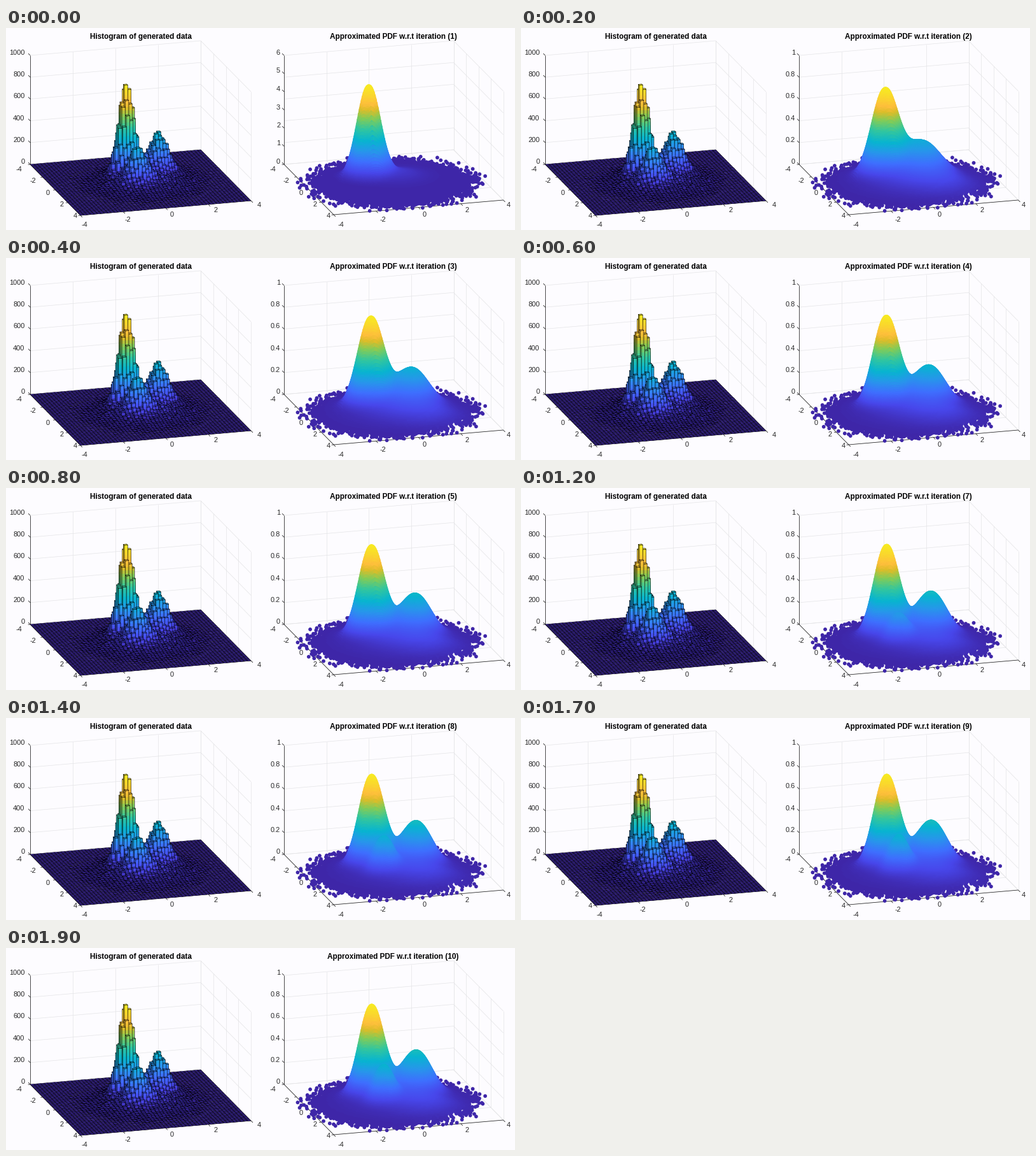
A matplotlib script for the animation above (2000 ms loop, 800 by 317 pixels).

```python
import numpy as np
import matplotlib.pyplot as plt
from matplotlib.animation import FuncAnimation
from matplotlib.collections import LineCollection, PolyCollection
from matplotlib.colors import LinearSegmentedColormap

W, H, DPI = 800, 317, 64
FRAMES, INTERVAL = 20, 100
INK = "#262626"
PX = 72 / DPI  # points per pixel

plt.rcParams["font.family"] = "Liberation Sans"
parula = LinearSegmentedColormap.from_list("parula", [
    (0, (0.2422, 0.1504, 0.6603)), (0.11, (0.2803, 0.2782, 0.9221)),
    (0.22, (0.2440, 0.4358, 0.9988)), (0.33, (0.1540, 0.5902, 0.9218)),
    (0.44, (0.0297, 0.7082, 0.8163)), (0.56, (0.1938, 0.7758, 0.6251)),
    (0.67, (0.5044, 0.7993, 0.3480)), (0.76, (0.8634, 0.7406, 0.1596)),
    (0.82, (0.9950, 0.7450, 0.2350)), (0.90, (0.9820, 0.8300, 0.1850)),
    (1, (0.9700, 0.9200, 0.1300))])

fig = plt.figure(figsize=(W / DPI, H / DPI), dpi=DPI, facecolor="#fdfcff")
ax = fig.add_axes([0, 0, 1, 1])
ax.set_xlim(0, W)
ax.set_ylim(H, 0)
ax.axis("off")


class Box:
    """Orthographic box: u runs right, v towards the viewer, z (0..1) up."""

    def __init__(self, origin, du, dv, height=171):
        self.o = np.array(origin, float)
        self.du = np.array(du) / 8
        self.dv = np.array(dv) / 8
        self.h = height

    def __call__(self, u, v, z=0.0):
        u, v, z = np.broadcast_arrays(np.asarray(u, float), v, z)
        x = self.o[0] + (u + 4) * self.du[0] + (v + 4) * self.dv[0]
        y = self.o[1] + (u + 4) * self.du[1] + (v + 4) * self.dv[1] - z * self.h
        return np.stack([x, y], axis=-1)

    def draw_frame(self, zticks):
        ticks = (-4, -2, 0, 2, 4)
        grid = []
        for t in ticks:
            grid += [self([t, t], -4, [0, 1]), self(4, [t, t], [0, 1]),
                     self([t, t], [-4, 4]), self([-4, 4], [t, t])]
        for z in zticks:
            grid += [self([-4, 4], -4, z), self(4, [-4, 4], z)]
        ax.add_collection(LineCollection(grid, colors="#e4e4e6", linewidths=0.7 * PX, zorder=1))
        dark = [self(-4, -4, [0, 1]), self(-4, [-4, 4]), self([-4, 4], 4)]
        for t in ticks:
            dark += [self([-4, -4.1], t), self(t, [4, 4.3])]
        ax.add_collection(LineCollection(dark, colors=INK, linewidths=0.8 * PX, zorder=2))

    def draw_zticks(self, zticks):
        lines = [self(-4, [-4, -4.3], z) for z in zticks]
        return ax.add_collection(LineCollection(lines, colors=INK, linewidths=0.8 * PX, zorder=2))


def label(x, y, s, ha="center", size=11, **kw):
    return ax.text(x, y, s, ha=ha, va="center_baseline", color=kw.pop("color", INK),
                   fontsize=size * PX, zorder=6, **kw)


def title(x, y, s):
    return label(x, y, s, size=11.75, weight="bold", color="black")


def edge_labels(side, front):
    """Tick labels along the left and front edges, each from first to last point."""
    for i, t in enumerate((-4, -2, 0, 2, 4)):
        k = i / 4
        x, y = np.array(side[0]) * (1 - k) + np.array(side[1]) * k
        label(x, y, str(t), ha="right")
        x, y = np.array(front[0]) * (1 - k) + np.array(front[1]) * k
        label(x, y, str(t))


def bump(u, v, u0, v0, s):
    return np.exp(-((u - u0) ** 2 + (v - v0) ** 2) / (2 * s * s))


# Left panel: histogram bars
left = Box((38, 214), (268, -23), (79, 80))
ticks5 = np.linspace(0, 1, 6)
left.draw_frame(ticks5)
left.draw_zticks(ticks5)
for z in ticks5:
    label(29.5, 209 - 171 * z, f"{1000 * z:.0f}", ha="right")
edge_labels(((25, 221), (112, 294)), ((123, 308), (398, 277)))
title(212, 12, "Histogram of generated data")

rng = np.random.default_rng(4)
BINS = 50
step = 8 / BINS
lows = -4 + step * np.arange(BINS)
bu, bv = np.meshgrid(lows, lows)
mu, mv = bu + step / 2, bv + step / 2
mean = (765 * bump(mu, mv, -0.37, -1.04, 0.34) + 350 * bump(mu, mv, 1.18, -1.1, 0.4)
        + 265 * bump(mu, mv, -0.22, 0.3, 0.36) + 75 * bump(mu, mv, 0.1, 0.1, 1.15))
counts = rng.poisson(mean) / 1000
peak = counts.max()

polys, faces, edges = [], [], []


def add(poly, face, edge):
    polys.append(poly)
    faces.append(face)
    edges.append(edge)


CLEAR, BLACK = (0, 0, 0, 0), (0, 0, 0, 1)


def wall(u, v, h):
    """A vertical face shaded by height, then its outline."""
    uu, vv = np.array(u)[[0, 1, 1, 0]], np.array(v)[[0, 1, 1, 0]]
    n = max(1, int(h * 171 / 5))
    for i in range(n, 0, -1):
        top = h * i / n
        add(left(uu, vv, [0, 0, top, top]), parula((top - h / n / 2) / peak), CLEAR)
    add(left(uu, vv, [0, 0, h, h]), CLEAR, BLACK)


for j in range(BINS):
    for i in reversed(range(BINS)):
        u, v, h = lows[i], lows[j], counts[j, i]
        u1, v1 = u + step, v + step
        if h > 0.003:
            wall((u, u), (v, v1), h)
            wall((u, u1), (v1, v1), h)
        add(left([u, u1, u1, u], [v, v, v1, v1], h), parula(h / peak), BLACK)
ax.add_collection(PolyCollection(polys, facecolors=faces, edgecolors=edges,
                                 linewidths=0.55 * PX, zorder=3))

# Right panel: density over the sample points
right = Box((437, 214), (266.5, -23), (78, 79))
right.draw_frame(ticks5)
edge_labels(((424, 221), (510, 294)), ((526, 308), (790, 277)))
heading = title(608.5, 13, "")
ZSETS = (np.linspace(0, 1, 7), ticks5)
zlines = [right.draw_zticks(zs) for zs in ZSETS]
zlabels = [[label(431, 209 - 171 * z, s, ha="right") for z, s in zip(zs, names)]
           for zs, names in zip(ZSETS, ("0 1 2 3 4 5 6".split(), "0 0.2 0.4 0.6 0.8 1".split()))]


def lattice(d, inner, outer):
    a = np.arange(-outer, outer, d)
    u, v = np.meshgrid(a, a)
    r = np.hypot(u, v)
    keep = (r >= inner) & (r < outer)
    return np.stack([u[keep], v[keep]], axis=1)


tail = rng.normal(0, 1.12, (50000, 2))
r = np.hypot(*tail.T)
tail = tail[(r > 3.05) & (r < 4.4)]
pts = np.concatenate([lattice(0.042, 0, 2.2), lattice(0.1, 2.15, 3.2), tail]) - (0.1, -0.08)
pts = pts[np.argsort(pts[:, 1] - 0.295 * pts[:, 0])]
pu, pv = pts.T
dots = ax.scatter(pu, pv, s=(5.8 * PX) ** 2, c=pu, cmap=parula, linewidths=0, zorder=4)


def density(k):
    """Share of the axis height at every point after k iterations."""
    if k == 1:
        return (0.83 * bump(pu, pv, -0.9, -0.95, 0.48)
                + 0.05 * bump(pu, pv, 0.4, -0.6, 0.8))
    a = k - 2
    near = np.exp(-a / 1.5)
    b = 0.365 - 0.13 * np.exp(-a / 2.4)
    c = 0.28 / (1 + np.exp(-2.2 * (k - 6.6)))
    return ((0.795 - 0.055 * near) * bump(pu, pv, -0.77 - 0.08 * near, -0.95, 0.52 + 0.03 * near)
            + b * bump(pu, pv, 1.27 - 0.4 * near, -0.6, 0.63 + 0.1 * near)
            + c * bump(pu, pv, -0.62, 0.55, 0.4)
            + (0.08 + 0.03 * near) * bump(pu, pv, 0, 0, 1.2)
            + 0.08 * bump(pu, pv, 1.1, 1.4, 1.0))


def update(frame):
    k = frame // 2 + 1
    z = density(k)
    dots.set_offsets(right(pu, pv, z))
    dots.set_array(z)
    dots.set_clim(0, z.max())
    heading.set_text(f"Approximated PDF w.r.t iteration ({k})")
    for i in range(2):
        shown = (k > 1) == (i == 1)
        zlines[i].set_visible(shown)
        for t in zlabels[i]:
            t.set_visible(shown)
    return dots, heading


anim = FuncAnimation(fig, update, frames=FRAMES, interval=INTERVAL, repeat=True,
                     repeat_delay=0, blit=False)
plt.show()
```
